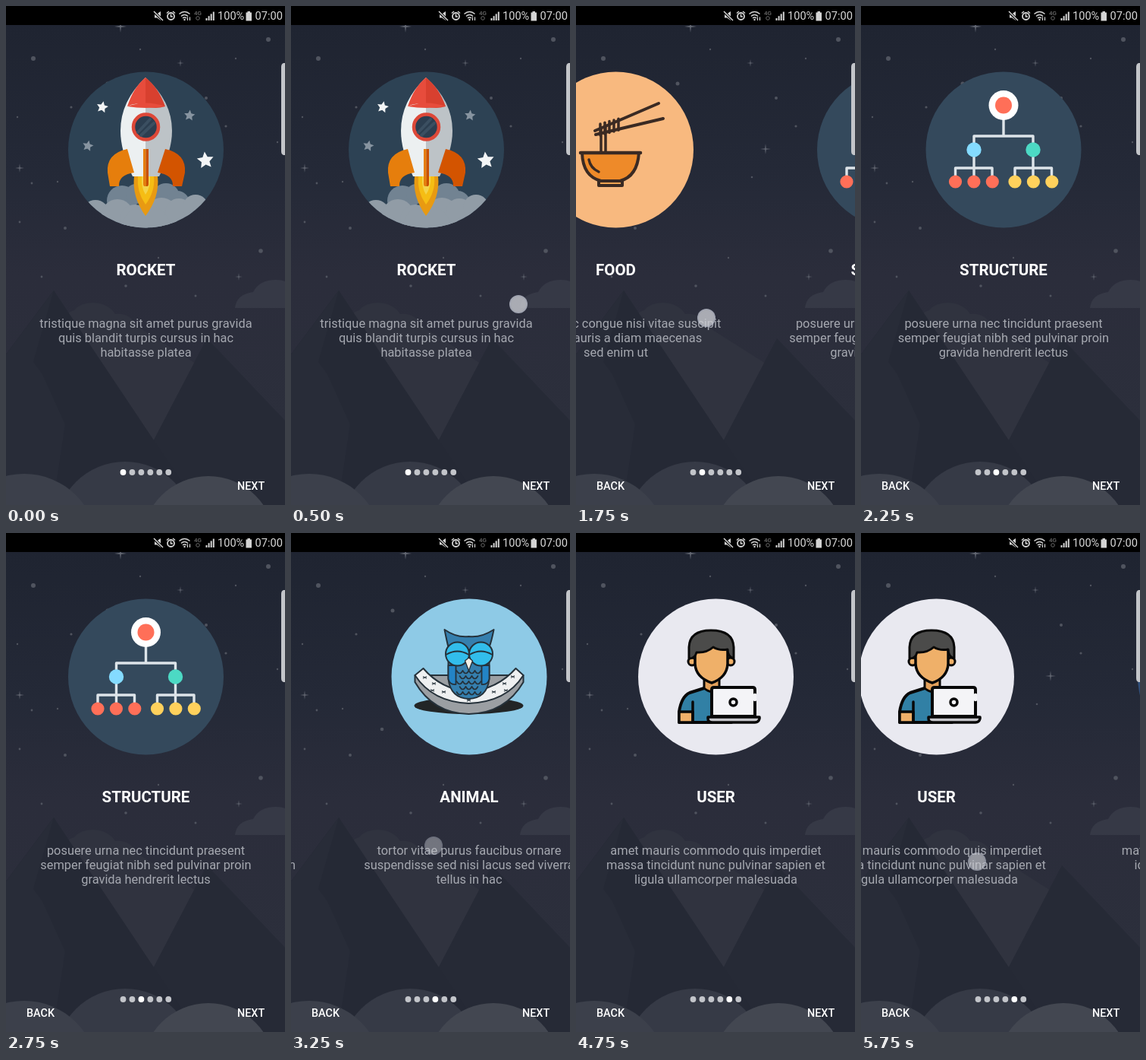
Recreate the animation shown at these times as an HTML page with a canvas. Size 368 by 656 pixels, loop 6000 ms.

```html
<!DOCTYPE html>
<html lang="en">
<head>
<meta charset="utf-8">
<title>Onboarding pager</title>
<style>
  html, body { margin: 0; width: 100%; height: 100%; overflow: hidden; background: #20242f; }
  body { position: relative; font-family: Roboto, sans-serif; }
  canvas { position: absolute; left: 0; top: 0; width: 368px; height: 656px; }
  .page { position: absolute; left: 0; top: 0; width: 369px; text-align: center; }
  .page h2, .page p { position: absolute; left: 0; width: 100%; margin: 0; white-space: pre; }
  .page h2 { top: 335px; font-size: 20.5px; line-height: 24px; font-weight: 700; color: #fff; }
  .page p { top: 408px; font-size: 16.4px; line-height: 19.2px; color: #a5a8b0; }
  .label { position: absolute; white-space: pre; color: #fff; font-size: 14.4px; line-height: 18px; font-weight: 500; top: 623px; }
  .status { top: 4px; font-size: 14.6px; font-weight: 400; color: #d8d8d8; }
  #touch { position: absolute; left: -12px; top: -12px; width: 24px; height: 24px; border-radius: 50%;
    background: radial-gradient(circle, #c9cbd1 0 55%, #b5bac9 72%, #7d849c 88%, #7d849c00 100%); }
</style>
</head>
<body>
<canvas id="stage"></canvas>
<div id="pages"></div>
<div class="label" id="back" style="left:27px">BACK</div>
<div class="label" style="left:305px">NEXT</div>
<div class="label status" style="left:279px">100%</div>
<div class="label status" style="left:328.5px">07:00</div>
<div id="touch"></div>
<script>
const W = 368, H = 656, LOOP = 6000, STEP = 250, CX = 184.5, CY = 189, R = 102.5;
const canvas = document.getElementById('stage');
const ctx = canvas.getContext('2d');
const ratio = window.devicePixelRatio || 1;
canvas.width = W * ratio;
canvas.height = H * ratio;
ctx.scale(ratio, ratio);

function disc(x, y, r, fill) {
  ctx.beginPath();
  ctx.arc(x, y, r, 0, Math.PI * 2);
  ctx.fillStyle = fill;
  ctx.fill();
}
function shape(d, fill, stroke, width = 2) {
  const path = new Path2D(d);
  if (fill) { ctx.fillStyle = fill; ctx.fill(path); }
  if (stroke) { ctx.strokeStyle = stroke; ctx.lineWidth = width; ctx.stroke(path); }
}
function ring(x, y, r, fill, stroke, width) {
  disc(x, y, r, fill);
  ctx.strokeStyle = stroke;
  ctx.lineWidth = width;
  ctx.stroke();
}
function star(x, y, r, fill, turn, inner = 0.48, points = 5) {
  ctx.beginPath();
  for (let i = 0; i < points * 2; i++) {
    const a = turn + i * Math.PI / points, d = i % 2 ? r * inner : r;
    ctx.lineTo(x + d * Math.sin(a), y - d * Math.cos(a));
  }
  ctx.closePath();
  ctx.fillStyle = fill;
  ctx.fill();
}

// Night landscape
const specks = [[36, 69, 3], [346, 44, 3], [120, 258, 2.3], [78, 292, 2], [336, 322, 2.8], [158, 368, 1.8],
  [250, 381, 1.5], [201, 331, 1.2], [47, 356, 1.4], [15, 146, 1.2], [177, 57, 1.2], [303, 69, 1.2],
  [264, 121, 2], [290, 158, 1.6], [34, 233, 1.4], [68, 231, 1.2], [18, 284, 1.4], [86, 133, 1.6],
  [134, 102, 2.5], [232, 225, 1.3], [358, 179, 1.2]];
const sparkles = [[151, 27, 8], [230, 75, 5], [18, 213, 6], [307, 356, 5], [250, 188, 7]];

function drawLandscape() {
  const sky = ctx.createLinearGradient(0, 25, 0, H);
  sky.addColorStop(0, '#1f2431');
  sky.addColorStop(0.3, '#242937');
  sky.addColorStop(0.52, '#2b2d3b');
  sky.addColorStop(1, '#2c303c');
  ctx.fillStyle = sky;
  ctx.fillRect(0, 0, W, H);
  for (const [x, y, r] of specks) disc(x, y, r, '#50545f');
  for (const [x, y, r] of sparkles) star(x, y, r, '#626671', 0, 0.16, 4);

  shape('M302 397Q304 379 326 376Q334 360 356 360Q364 360 368 362V397Z', '#363946');
  shape('M72 420Q77 403 90 400Q98 390 115 390Q135 391 144 405Q164 403 171 420L250 470V600H72Z', '#30333f');
  shape('M265 437L368 545V656H150Z', '#262a36');
  shape('M63 374L252 656H0V458Z', '#252935');
  shape('M63 374L36 468L48 484L78 550L62 656H0V458Z', '#282c38');
  disc(157, 691, 92, '#363a46');
  disc(24, 712, 97, '#3c404b');
  disc(267, 706, 88, '#434751');
}

// Page icons
function drawRocket() {
  ctx.save();
  ctx.beginPath();
  ctx.arc(CX, CY, R, 0, Math.PI * 2);
  ctx.clip();
  for (const [x, y, r] of [[153, 256, 20], [171, 247, 13], [211, 251, 18], [226, 259, 16]]) disc(x, y, r, '#728392');
  for (const [x, y, r] of [[118, 273, 18], [147, 275, 21], [170, 281, 20], [205, 274, 22], [228, 271, 18], [250, 265, 17], [185, 293, 32]])
    disc(x, y, r, '#919ca6');
  ctx.restore();
  star(127, 133, 8, '#f3f5f6', 0.2);
  star(263, 203, 11.5, '#f3f5f6', -0.1);
  star(242, 144, 7.5, '#8794a0', 0.1);
  star(108, 184, 7.5, '#8794a0', 0.2);
  shape('M169 224Q166 251 184 276Q203 251 200 224Z', '#e89a12');
  shape('M174 224Q172 244 184 261Q197 244 195 224Z', '#f5bd14');
  shape('M179 224Q178 238 184 248Q191 238 190 224Z', '#f4d44a');
  shape('M184 94Q151 125 151 164Q151 190 167 224H184Z', '#ecf0f1');
  shape('M184 94Q219 125 219 164Q219 190 202 224H184Z', '#bdc3c7');
  shape('M184 94Q168 107 160 132Q172 125 184 132Z', '#e74c3c');
  shape('M184 94Q201 107 210 132Q197 136 184 132Z', '#d8402f');
  shape('M160 132Q184 123 210 132Q184 136 160 132Z', '#e74c3c');
  ring(184.5, 159, 16.5, '#2c3e50', '#dd4838', 4.5);
  shape('M174 166L190 149M178 170L195 154', null, '#3b4f61', 4);
  shape('M160 188Q132 194 134 219L137 237H149Q148 222 169 219Z', '#e67e0c');
  shape('M210 188Q238 194 236 219L232 237H220Q221 222 200 219Z', '#d35400');
  shape('M181 188H184.5V237H183Q181 237 181 234Z', '#e67e0c');
  shape('M184.5 188H188V234Q188 237 186 237H184.5Z', '#c95000');
}

function drawFood() {
  const ink = '#3a2a23';
  shape('M140 193H215Q213 224 190 230H165Q141 224 140 193Z', '#ee8a29', ink, 4);
  shape('M162 230H193V236H162Z', '#f0a452', ink, 4);
  shape('M138 193H217', null, ink, 4.5);
  shape('M149 202Q151 213 162 218', null, ink, 3.5);
  shape('M165 160V191M171 157V191', null, ink, 3.5);
  shape('M241 128L157 164M247 148L158 169', null, ink, 4);
  for (let i = 0; i < 5; i++) {
    const x = 164 + i * 6, y = 155 - i * 1.7;
    shape(`M${x} ${y}V${y + 15}`, null, ink, 3.5);
  }
}

function drawTree() {
  const line = '#dde4e9';
  shape('M184.5 148V171M145.5 213V171H223.5V213M121 231V213H169.5V231M145.5 213V231M199.5 231V213H248V231M223.5 213V231', null, line, 3.4);
  disc(184.5, 130.5, 19.5, '#fff');
  disc(184.5, 130.5, 11, '#ff6f58');
  disc(145.5, 189, 9.7, '#84dbff');
  disc(223.5, 189, 9.7, '#4cd9c4');
  for (let i = 0; i < 3; i++) {
    disc(121 + i * 24.4, 231, 8.6, '#ff6f58');
    disc(199.5 + i * 24.4, 231, 8.6, '#ffd15c');
  }
}

function drawOwl() {
  const ink = '#25313a';
  shape('M112 227A72 11 0 1 0 256 227A72 11 0 1 0 112 227Z', '#222526');
  shape('M113 187V196Q137 237 184 238Q232 237 256 196V187Z', '#9b9fa3', ink, 2);
  shape('M113 187L124 178Q148 206 184 208Q221 206 246 178L256 187Q234 222 184 224Q136 222 113 187Z', '#eef0f1', ink, 2);
  for (const [x, y] of [[126, 190], [138, 198], [136, 207], [151, 209], [231, 198], [242, 189], [233, 207], [217, 209], [184, 220]])
    shape(`M${x - 2} ${y - 1}l4 2m0-2l-4 2`, null, ink, 1.3);
  shape('M152 127Q168 138 184 136Q200 138 217 127Q214 142 211 150V192Q208 217 184 218Q160 217 157 192V150Q155 142 152 127Z', '#357fae', ink, 2);
  shape('M157 174V192Q159 200 167 199V174ZM211 174V192Q209 200 201 199V174Z', '#2384c6', ink, 1.8);
  for (let row = 0; row < 5; row++)
    for (let i = 0; i < 4 - row % 2; i++) {
      const x = 168 + i * 8 + row % 2 * 4, y = 181 + row * 7;
      shape(`M${x} ${y}q4 7 8 0`, null, ink, 1.6);
    }
  for (const x of [169, 200]) {
    ring(x, 159, 15.5, '#32bdeb', ink, 2);
    shape(`M${x - 15} 160Q${x} 151 ${x + 15} 160`, null, ink, 1.8);
  }
  shape('M179 168L184 164L189 168L184 181Z', '#f3f0e6', ink, 1.3);
}

function drawUser() {
  const ink = '#080808', skin = '#efb069';
  shape('M136 249V235Q139 215 150 210L169 204H189L205 209V249Z', '#3180a5', ink, 4);
  shape('M136 235H154V249H136Z', skin, ink, 3.5);
  shape('M154 222V249', null, ink, 3.5);
  shape('M169 190V204Q179 213 189 204V190Z', '#e3a05a', ink, 3);
  ring(153, 169, 5, skin, ink, 3);
  ring(204, 169, 5, skin, ink, 3);
  shape('M157 148H200V172Q199 190 179 197Q158 190 157 172Z', skin, ink, 3.5);
  shape('M149 165V150Q150 128 178 128Q207 128 208 150V165Q200 163 200 153Q189 155 181 150Q172 158 159 157Q157 165 149 165Z', '#4b4b4a', ink, 3);
  shape('M179 241V206Q179 203 182 203H233Q236 203 236 206V241Z', '#f4f4f7', ink, 4);
  shape('M174 242H242V244Q241 249 236 249H180Q174 249 174 244Z', '#c5c5ca', ink, 3.5);
  ring(207.5, 222.5, 4.5, '#f4f4f7', ink, 3.5);
  shape('M236 213V219', null, '#f4f4f7', 4.5);
}

const pages = [
  ['ROCKET', 'tristique magna sit amet purus gravida\nquis blandit turpis cursus in hac\nhabitasse platea', '#2d4254', drawRocket],
  ['FOOD', 'mauris nunc congue nisi vitae suscipit\ntellus mauris a diam maecenas\nsed enim ut', '#f8b97f', drawFood],
  ['STRUCTURE', 'posuere urna nec tincidunt praesent\nsemper feugiat nibh sed pulvinar proin\ngravida hendrerit lectus', '#34495c', drawTree],
  ['ANIMAL', 'tortor vitae purus faucibus ornare\nsuspendisse sed nisi lacus sed viverra\ntellus in hac', '#8ecae6', drawOwl],
  ['USER', 'amet mauris commodo quis imperdiet\nmassa tincidunt nunc pulvinar sapien et\nligula ullamcorper malesuada', '#e9e9f0', drawUser],
  ['SETTINGS', 'mattis rhoncus urna neque viverra\nid aliquet risus feugiat in ante\njusto nec ultrices', '#31507c', null]
];
const pageEls = pages.map(([title, text]) => {
  const el = document.createElement('div');
  const h2 = document.createElement('h2'), p = document.createElement('p');
  el.className = 'page';
  h2.textContent = title;
  p.textContent = text;
  el.append(h2, p);
  document.getElementById('pages').append(el);
  return el;
});

function drawChrome(current) {
  for (let i = 0; i < pages.length; i++)
    disc(154.5 + i * 11.95, 613, 3.9, i === current ? '#fff' : '#c3c5ca');
  shape('M368 75H366Q363 76 363 80V191Q363 195 366 196H368Z', '#c3c5c9');
  ctx.fillStyle = '#000';
  ctx.fillRect(0, 0, W, 25);

  const on = '#d4d4d4', off = '#686868';
  shape('M196 10.5H199L204 7V19L199 15.5H196Z', on);
  shape('M194.5 7L207 19', null, '#000', 3.5);
  shape('M195 7L207 19', null, on, 1.5);
  ring(217.5, 13.5, 4.5, '#000', on, 1.8);
  shape('M217.5 10.5V14H220M212 9.5L215 7M223 9.5L220 7', null, on, 1.5);
  shape('M228.5 10.5Q235.5 4.5 242.5 10.5M231 13.5Q235.5 9.5 240 13.5M233 16Q235.5 14 238 16', null, on, 1.6);
  disc(235.5, 18, 1.2, on);
  shape('M239.5 19V14.5M242.5 14.5V19', null, on, 1.2);
  ctx.fillStyle = off;
  ctx.font = '500 8px Roboto, sans-serif';
  ctx.fillText('4G', 248, 12);
  ring(253, 16, 2.3, '#000', off, 1);
  for (let i = 0; i < 4; i++) {
    ctx.fillStyle = on;
    ctx.fillRect(263.5 + i * 3.1, 16 - i * 2.8, 2, 3 + i * 2.8);
  }
  shape('M316.5 8.5H318.5V7H322V8.5H324V19.5H316.5Z', on);
}

// Time, scroll, then finger x, y and opacity while it is visible
const moves = [
  [0, 0], [500, 6, 300, 392, 0.8], [750, 300], [1000, 365.5], [1250, 368],
  [1500, 410, 258, 400, 0.8], [1750, 500, 172, 410, 0.8], [2000, 672], [2250, 732.5], [2500, 736],
  [3000, 842, 205, 405, 0.8], [3250, 1053.5, 188, 411, 0.45], [3500, 1102.5], [3750, 1104],
  [4000, 1104, 307, 377, 1], [4250, 1222, 180, 400, 0.8], [4500, 1470], [4750, 1472],
  [5500, 1511, 199, 428, 0.8], [5750, 1557, 153, 432, 0.65]
];
const back = document.getElementById('back'), touch = document.getElementById('touch');

function render(time) {
  const [, scroll, x = 0, y = 0, alpha = 0] = moves.findLast(move => move[0] <= time);
  const current = Math.round(scroll / W);
  drawLandscape();
  pages.forEach(([, , fill, icon], i) => {
    const dx = i * W - scroll;
    const visible = Math.abs(dx) < W;
    pageEls[i].style.visibility = visible ? 'visible' : 'hidden';
    pageEls[i].style.transform = `translateX(${dx}px)`;
    if (!visible) return;
    ctx.save();
    ctx.translate(dx, 0);
    ctx.lineJoin = ctx.lineCap = 'round';
    disc(CX, CY, R, fill);
    if (icon) icon();
    ctx.restore();
  });
  drawChrome(current);
  back.style.visibility = current ? 'visible' : 'hidden';
  touch.style.opacity = alpha;
  touch.style.transform = `translate(${x}px, ${y}px)`;
}

const start = performance.now();
let shown = -1;
function tick() {
  const elapsed = Math.max(0, performance.now() - start) % LOOP;
  const time = Math.floor(elapsed / STEP) * STEP;
  if (time !== shown) render(shown = time);
  requestAnimationFrame(tick);
}
tick();
</script>
</body>
</html>
```
